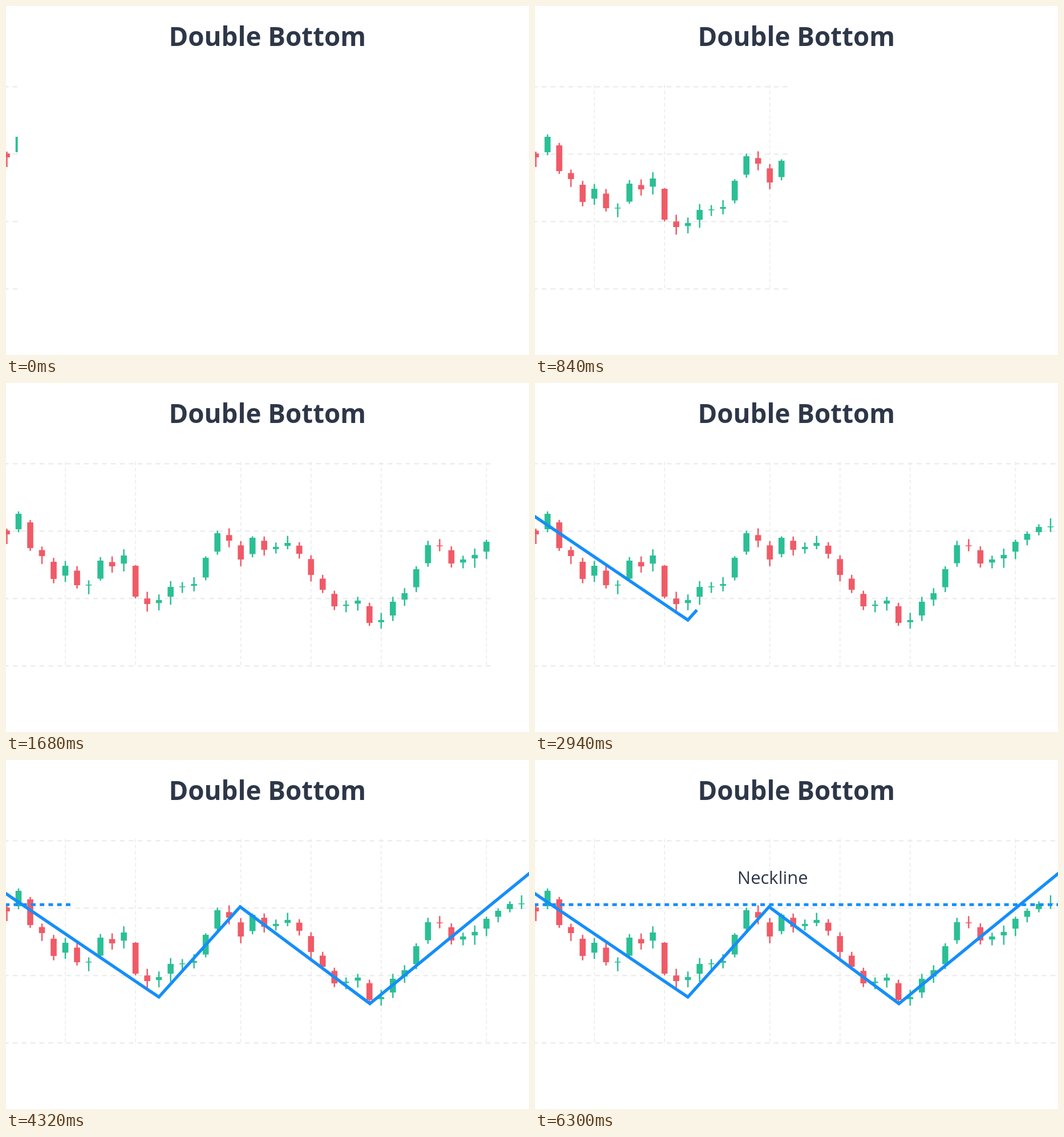
Animation of 917 by 611 pixels, one loop 6420 ms. Source, as an HTML page:

```html
<!DOCTYPE html>
<html lang="en">
<head>
<meta charset="utf-8">
<title>Double Bottom</title>
<style>
  html, body { margin: 0; width: 100%; height: 100%; overflow: hidden; background: #fff; }
  svg { position: absolute; left: 0; top: 0; width: 917px; height: 611px; }
  text { font-family: "Open Sans", "Noto Sans", sans-serif; fill: #2d3748; text-anchor: middle; }
  .title { font-size: 45.7px; font-weight: 700; }
  .label { font-size: 31px; font-weight: 500; }
  .grid { stroke: #ebebed; }
  .up { fill: #2bbf95; }
  .down { fill: #f05a67; }
  .trend { fill: none; stroke: #158efa; stroke-width: 5.4; stroke-miterlimit: 10; }
  .neck { stroke: #158efa; stroke-width: 5; stroke-dasharray: 8 7.27; }
</style>
</head>
<body>
<svg id="chart"></svg>
<svg>
  <text class="title" x="458.3" y="69.5">Double Bottom</text>
  <path id="trend" class="trend" d="M-6 230 L268 415 L410.5 257 L638 426.5 L923 194"/>
</svg>
<svg id="neck"><line class="neck" x1="-1.9" y1="253.3" x2="917" y2="253.3"/></svg>
<svg><text id="label" class="label" x="416.8" y="217">Neckline</text></svg>
<script>
const LOOP = 6420, STEP = 60;
const byId = id => document.getElementById(id);

function add(tag, attrs) {
  const el = document.createElementNS('http://www.w3.org/2000/svg', tag);
  for (const key in attrs) el.setAttribute(key, attrs[key]);
  byId('chart').append(el);
}

// grid
for (let i = 0; i < 4; i++) {
  const y = 141.3 + 118 * i;
  add('line', { class: 'grid', x1: -3.8, x2: 917, y1: y, y2: y,
    'stroke-width': 2.2, 'stroke-dasharray': '8.3 7.35' });
}
for (const slot of [5, 11, 20, 26, 32, 41]) {
  const x = 1.5 + 20.51 * slot;
  add('line', { class: 'grid', x1: x, x2: x, y1: 138, y2: 499,
    'stroke-width': 1.6, 'stroke-dasharray': '6 4.6' });
}

let seed = 7;
function random() {
  seed = seed * 16807 % 2147483647;
  return seed / 2147483647;
}

function bar(kind, x, width, top, bottom) {
  add('rect', { class: kind, x: x - width / 2, y: top, width, height: bottom - top });
}

// Each candle opens a quarter of the way from the last close to its own.
const closes = [265, 229, 289, 303, 343, 320, 354, 353, 311, 321, 302, 374, 387, 380, 357,
  356, 352, 306, 263, 276, 309, 271, 292, 287, 280, 299, 336, 362, 391, 388, 381, 420,
  415, 383, 368, 326, 284, 285, 316, 309, 301, 278, 264, 252, 251];
let last = 256;
closes.forEach((close, i) => {
  const open = last + (close - last) / 4;
  const kind = close > open ? 'down' : 'up';
  const x = 1.5 + 20.51 * i;
  const top = Math.min(open, close);
  const bottom = Math.max(open, close, top + 1.5);
  const reach = 18 - (bottom - top) / 4;
  bar(kind, x, 2.5, top - reach * (0.2 + 0.6 * random()), bottom + reach * (0.3 + 0.8 * random()));
  bar(kind, x, 10.6, top, bottom);
  last = close;
});

// motion
const moves = [];
function move(id, from, to, keyframes, easing = 'linear') {
  const anim = byId(id).animate(keyframes,
    { delay: from, duration: to - from, fill: 'both', easing });
  anim.pause();
  moves.push(anim);
}
const wipe = x => ({ clipPath: `inset(0 ${917 - x}px 0 0)` });

move('chart', 0, 1920, [wipe(20.6), wipe(917)], 'cubic-bezier(.6, .64, .88, 1)');
move('neck', 4020, 5220, [wipe(0), wipe(917)], 'cubic-bezier(.4, .08, .7, .77)');
move('label', 4560, 4860, [
  { opacity: 0, transform: 'translateY(10px)' },
  { opacity: 1, transform: 'none' }], 'ease-out');

// The trend line pauses at its first low.
const trend = byId('trend');
const length = trend.getTotalLength();
const firstLow = Math.hypot(274, 185);
trend.style.strokeDasharray = `${length} ${length + 10}`;
const left = (drawn, easing = 'linear') => ({ strokeDashoffset: `${length - drawn}px`, easing });
move('trend', 2100, 3900, [
  left(0, 'ease-out'),
  { ...left(firstLow, 'cubic-bezier(.3, .1, .7, .9)'), offset: 780 / 1800 },
  left(length)]);

const start = performance.now();
function draw(time) {
  for (const anim of moves) anim.currentTime = time;
}
function tick() {
  const time = (performance.now() - start) % LOOP;
  draw(Math.min(Math.floor(time / STEP) * STEP, LOOP - 2 * STEP));
  requestAnimationFrame(tick);
}
draw(0);
requestAnimationFrame(tick);
</script>
</body>
</html>
```
